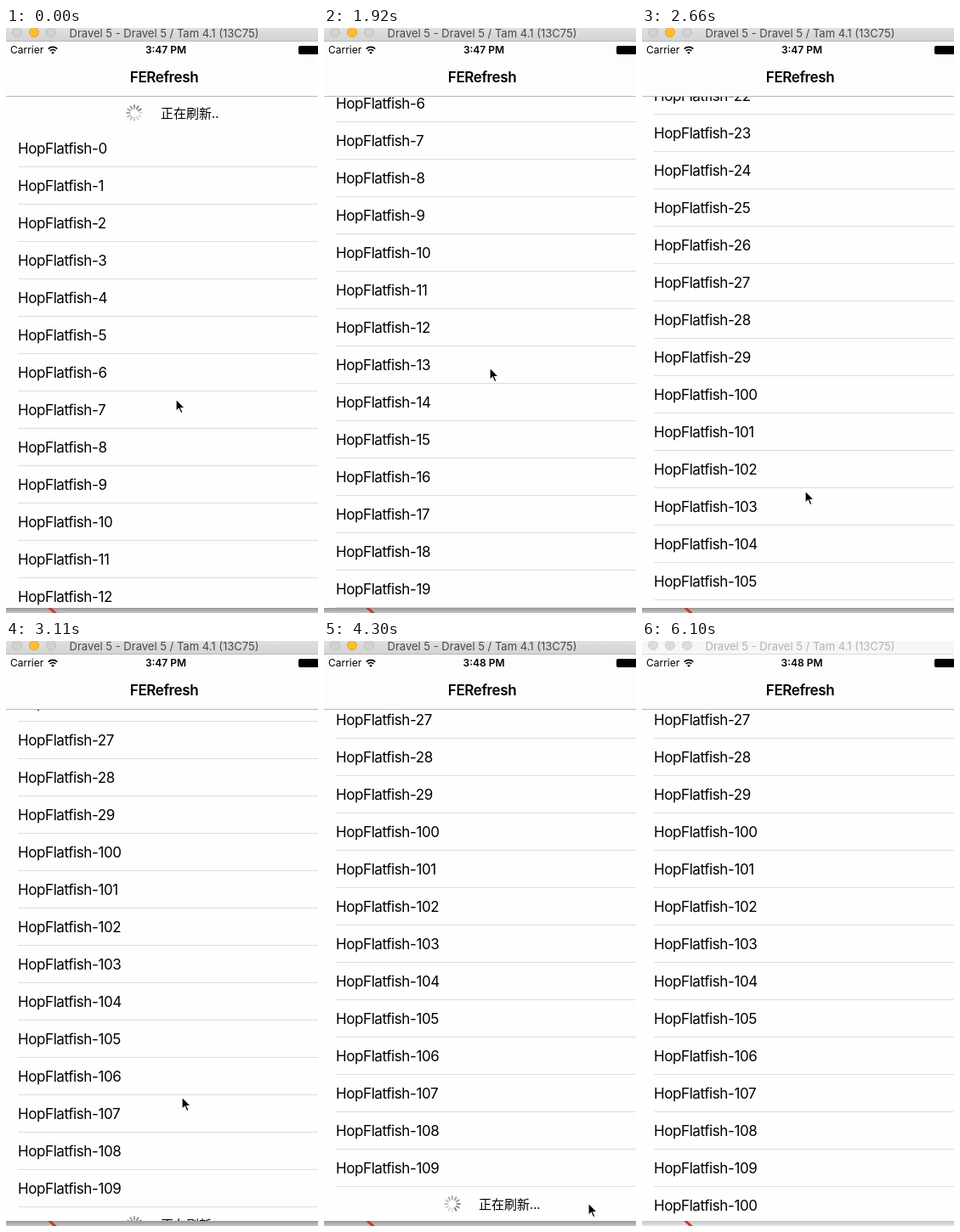
These frames come from a looping animation (367 px wide and 689 px high, 6.19 s). An HTML page:

```html
<!DOCTYPE html>
<html lang="zh">
<head>
<meta charset="utf-8">
<title>FERefresh</title>
<style>
html, body { margin: 0; height: 100%; overflow: hidden; }
body { position: relative; background: #fff; color: #000; font-family: Inter, Roboto, sans-serif; }
div, svg { position: absolute; }
#desk { left: 0; right: 0; bottom: 0; height: 6px; background: linear-gradient(#969696, #c6c6c6); }
#desk svg { left: 50px; top: 0; }
#win { left: 0; top: 0; width: 367px; height: 683px; overflow: hidden; background: #fefefe; }
#list { left: 0; top: 80px; width: 100%; }
.row { left: 14px; right: 0; height: 43px; border-bottom: 1px solid #dddce0; font-size: 17px; line-height: 44px; letter-spacing: -.41px; }
.load { left: 0; width: 100%; height: 40px; }
.load div { left: 182px; font: 15px/40px "Noto Sans CJK SC", "Noto Sans CJK", sans-serif; white-space: nowrap; }
.load svg { left: 141px; top: 10px; }
#nav { left: 0; top: 16px; width: 100%; height: 64px; background: #fdfdfd; border-bottom: 1px solid #b9b9b9; }
#nav div { line-height: 20px; white-space: nowrap; }
#carrier { left: 5px; font-size: 12px; }
#clock { left: 0; width: 376px; text-align: center; font-size: 12px; font-weight: 600; }
#title { left: 0; top: 32px; width: 372px; text-align: center; font-size: 17px; font-weight: 600; letter-spacing: -.41px; }
#battery { left: 344px; top: 5px; width: 26px; height: 10px; border-radius: 2px; background: #000; }
#bar { left: 0; top: 0; width: 100%; height: 15px; border-bottom: 1px solid #b9b9b9; background: linear-gradient(#e0e0e0, #d3d3d3); color: #484848; }
#bar div { box-sizing: border-box; top: -1px; width: 12px; height: 12px; border-radius: 6px; background: #d2d2d2; border: 1px solid #bdbdbd; }
#bar #amber { background: #fdbd2e; border-color: #e3a32a; }
#bar #name { left: 0; top: -4px; width: 372px; height: 20px; border: 0; background: none; text-align: center; font-size: 13px; line-height: 20px; white-space: nowrap; }
.idle #bar { background: #f6f6f6; color: #b3b3b3; border-color: #dadada; }
.idle #bar div, .idle #bar #amber { background: #dcdcdc; border-color: #d0d0d0; }
.idle #bar #name { background: none; }
.idle #desk { background: linear-gradient(#c4c4c4, #e8e8e8); }
#mouse { left: 0; top: 0; overflow: visible; }
</style>
</head>
<body>
<div id="desk"><svg width="10" height="6"><path d="M0-1 10 8" stroke="#c8372d" stroke-width="3"/></svg></div>
<div id="win">
  <div id="list"></div>
  <div id="nav">
    <div id="carrier">Carrier</div>
    <svg style="left:49px;top:5px" width="12" height="10" fill="none" stroke="#000" stroke-width="1.6">
      <path d="M.7 3.6a7.5 7.5 0 0 1 10.6 0M2.7 5.9a4.6 4.6 0 0 1 6.6 0"/>
      <path d="M6 9.8 4.2 7.9a2.6 2.6 0 0 1 3.6 0z" fill="#000" stroke="none"/>
    </svg>
    <div id="clock"></div>
    <div id="battery"></div>
    <div id="title">FERefresh</div>
  </div>
  <div id="bar">
    <div style="left:7px"></div><div id="amber" style="left:27px"></div><div style="left:47px"></div>
    <div id="name">Dravel 5 - Dravel 5 / Tam 4.1 (13C75)</div>
  </div>
</div>
<svg id="mouse" width="12" height="18"><path d="M0 0V14.5L3.3 11.4 5.6 16.8 8 15.8 5.7 10.5H10.4Z" stroke="#fff" stroke-width="1.2"/></svg>
<script>
const LOOP = 6190, STEP = 147.9, ROW = 44, LOADED = 40;
const $ = id => document.getElementById(id);
const list = $('list');

// step, scroll offset, pointer x, pointer y
const keys = [
  [0, -40, 200, 437], [6, -40, 196, 438], [8, 0, 191, 440], [9, 0, 191, 480],
  [11, 90, 195, 400], [13, 277, 195, 400], [15, 370, 193, 545], [16, 520, 192, 500],
  [18, 990, 192, 545], [20, 1130, 195, 560], [22, 1215, 219, 514], [23, 1204, 219, 514],
  [25, 1197, 219, 514], [29, 1197, 311, 662], [30, 1197, 318, 680]
];

function add(cls, y, html) {
  const el = document.createElement('div');
  el.className = cls;
  el.style.top = y + 'px';
  el.innerHTML = html;
  list.append(el);
  return el;
}

function loader(y, text) {
  let spokes = '';
  for (let i = 0; i < 12; i++)
    spokes += `<path d="M0-5.5V-9" transform="translate(10 10)rotate(${i * 30})"/>`;
  return add('load', y, `<svg width="20" height="20" stroke="#777" stroke-width="1.8" stroke-linecap="round">${spokes}</svg><div>${text}</div>`);
}

const rows = Array.from({ length: LOADED + 1 }, (_, i) =>
  add('row', i * ROW, 'HopFlatfish-' + (i < 30 ? i : 100 + i % 10)));
loader(-40, '正在刷新..');
const footer = loader(LOADED * ROW, '正在刷新...');
const spokes = document.querySelectorAll('.load path');

function pose(n) {
  const j = keys.findIndex(k => k[0] > n);
  if (j < 0) return keys[keys.length - 1];
  const a = keys[j - 1], b = keys[j], p = (n - a[0]) / (b[0] - a[0]);
  return a.map((v, i) => Math.round(v + (b[i] - v) * p));
}

const show = (el, on) => el.style.visibility = on ? 'visible' : 'hidden';

function draw() {
  const t = performance.now() % LOOP;
  const n = Math.floor((t + 6) / STEP);
  const [, scroll, x, y] = pose(n);
  list.style.transform = `translateY(${-scroll}px)`;
  $('mouse').style.transform = `translate(${x}px,${y}px)`;
  show($('mouse'), n < 31);
  show(footer, n < 37);
  show(rows[LOADED], n >= 37);
  const head = 2 + Math.floor(n * 1.775);
  spokes.forEach((s, i) => s.style.opacity = 1 - .07 * ((head - i % 12 + 60) % 12));
  $('clock').textContent = n < 27 ? '3:47 PM' : '3:48 PM';
  document.body.className = t >= 6100 ? 'idle' : '';
  requestAnimationFrame(draw);
}
draw();
</script>
</body>
</html>
```
